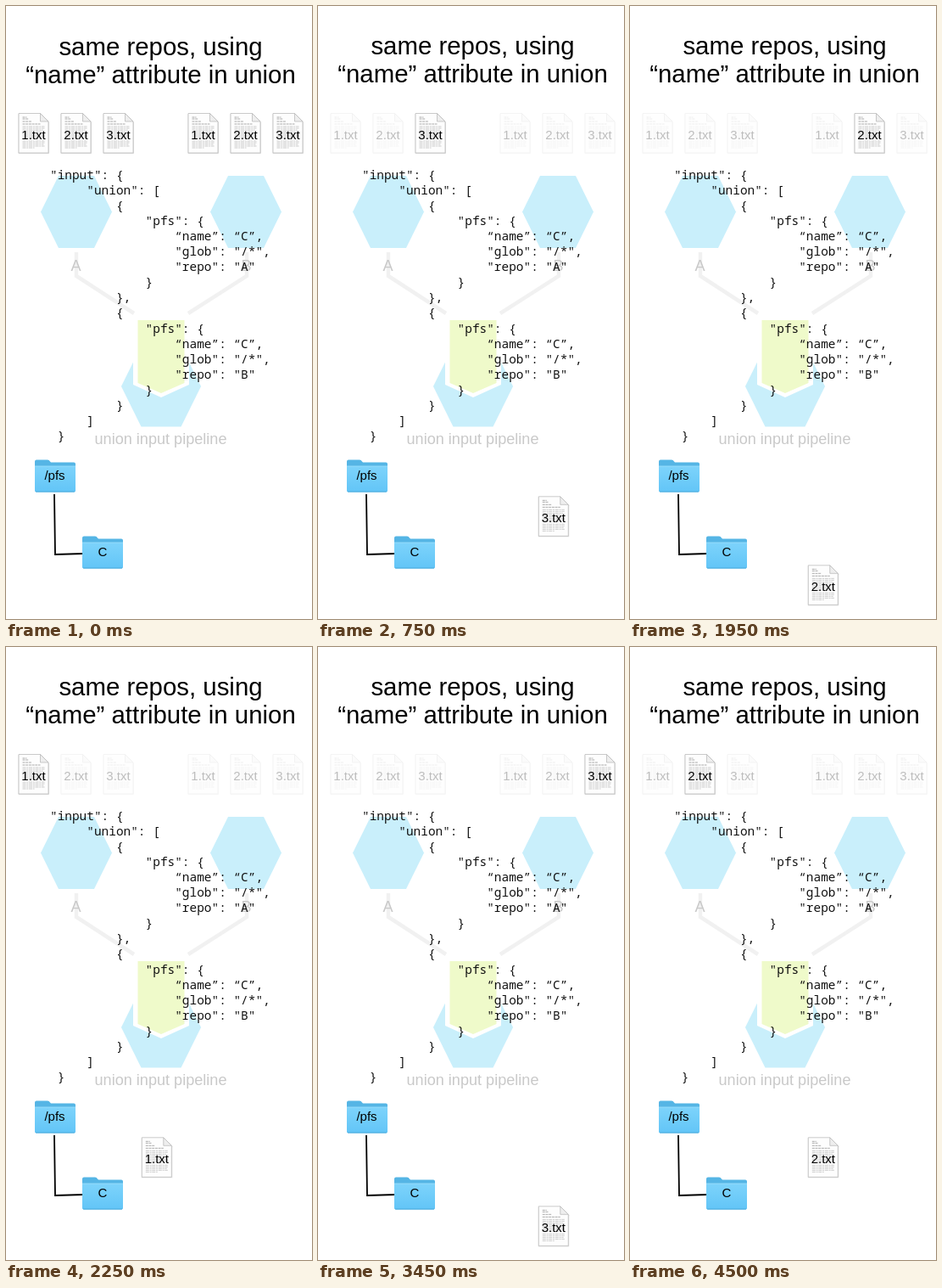
Animation, 361 px wide and 722 px high, one loop 5250 ms. Source, as an HTML page:

```html
<!DOCTYPE html>
<html lang="en">
<head>
<meta charset="utf-8">
<title>Union input</title>
<style>
  html, body { margin: 0; height: 100%; overflow: hidden; background: #fff; }
  svg { display: block; width: 361px; height: 722px; font-family: "Liberation Sans", Arial, sans-serif; }
  .mid { text-anchor: middle; }
  .title { font-size: 29.4px; }
  .code { font: 14.43px "Noto Sans Mono", monospace; white-space: pre; fill: #111; }
  .caption { font-size: 18.1px; fill: #c9c9c9; }
  .label { font-size: 15px; }
  .faded .page { opacity: .2; }
  .faded .label { opacity: .24; }
</style>
</head>
<body>
<svg id="stage" viewBox="0 0 361 722">
  <defs>
    <linearGradient id="blue" x2="0" y2="1">
      <stop stop-color="#7dd3fb"/><stop offset="1" stop-color="#62c5f7"/>
    </linearGradient>
    <g id="page">
      <path d="M-18 1H8.500L18.500 11V48H-18Z" fill="#000" opacity=".13"/>
      <path d="M-17.500.5H8L17.500 10V47H-17.500Z" fill="#fdfdfd" stroke="#bdbdbd" stroke-width=".8"/>
      <path d="M-13 5h5M-13 7h7M-13 10h11M-13 13h21" stroke="#aaa" stroke-dasharray="3 .7"/>
      <path d="M-13 16h26M-13 18h26M-13 20h24M-13 22h26M-13 24h25M-13 26h26M-13 28h26M-13 30h22M-13 33h26M-13 35h26M-13 37h25M-13 39h26M-13 41h14"
            stroke="#c6c6c6" stroke-width=".9" stroke-dasharray="4 .8 2 .7"/>
      <path d="M8 .5V10H17.500Z" fill="#eee" stroke="#b5b5b5" stroke-width=".7"/>
    </g>
    <g id="folder">
      <path d="M0 2q0-2 2-2h13q2 0 3 2l1 1h27q2 0 2 2v32H0Z" fill="#55b5e5"/>
      <path d="M0 7.500h48V36q0 2-2 2H2q-2 0-2-2Z" fill="url(#blue)"/>
      <path d="M0 7.500h48" stroke="#a0e0fc" stroke-width=".8"/>
      <path d="M1 37.500h46" stroke="#4ba9da"/>
    </g>
    <path id="hexagon" d="M-42 0L-21-42.500H21L42 0 21 42.500H-21Z" fill="#c9effb"/>
  </defs>

  <g id="title" class="title mid">
    <text x="182.500" y="57">same repos, using</text>
    <text x="182.500" y="90">“name” attribute in union</text>
  </g>

  <use href="#hexagon" x="83" y="242.500"/>
  <use href="#hexagon" x="283" y="242.500"/>
  <use href="#hexagon" transform="translate(183 448) scale(1.12)"/>
  <path d="M83 290V318L151 362M284 290V318L215 362" fill="none" stroke="#f1f1f1" stroke-width="4.500"/>
  <path d="M150 366H216V446L183 461 150 446Z" fill="#fff"/>
  <path d="M155.500 370H210.500V444L183 456 155.500 444Z" fill="#effaca"/>
  <g class="caption mid">
    <text x="82.500" y="312">A</text>
    <text x="283.500" y="312">B</text>
    <text x="182.500" y="516">union input pipeline</text>
  </g>

  <g id="code" class="code"></g>

  <path d="M57 575L58 646 91 645" fill="none" stroke="#000" stroke-width="1.800"/>
  <use href="#folder" x="34" y="534.500"/>
  <use href="#folder" x="90" y="624.500"/>
  <g class="label mid">
    <text x="57.500" y="558">/pfs</text>
    <text x="114" y="648">C</text>
  </g>
</svg>

<script>
const stage = document.getElementById("stage");
const title = document.getElementById("title");

function add(parent, tag, attrs, text = "") {
  const node = document.createElementNS("http://www.w3.org/2000/svg", tag);
  for (const key in attrs) node.setAttribute(key, attrs[key]);
  node.textContent = text;
  return parent.appendChild(node);
}

function addFile(name, x, y) {
  const file = add(stage, "g", { transform: `translate(${x} ${y})` });
  add(file, "use", { href: "#page", class: "page" });
  add(file, "text", { class: "label mid", y: 30.5 }, name);
  return file;
}

const pfs = repo => [
  [9, "{"], [13, '"pfs": {'], [17, "“name”: “C”,"], [17, '"glob": "/*",'],
  [17, `"repo": "${repo}"`], [13, "}"]
];
const lines = [
  [0, '"input": {'], [5, '"union": ['], ...pfs("A"), [9, "},"],
  ...pfs("B"), [9, "}"], [5, "]"], [1, "}"]
];
lines.forEach(([column, text], row) =>
  add(document.getElementById("code"), "text",
    { x: 52 + column * 8.66, y: 204 + row * 18.05 }, text));

// Files 0-2 belong to repo A, 3-5 to repo B.
const files = [0, 1, 2, 3, 4, 5].map(i => {
  const repo = Math.floor(i / 3), slot = i % 3, name = `${slot + 1}.txt`;
  return {
    input: addFile(name, 32.5 + repo * 200 + slot * 50, 126),
    output: addFile(name, 177.8 + slot * 50, 577.3 + repo * 81)
  };
});

const order = [null, 2, 4, 0, 5, 3, 1];
const stepTime = 750;

function draw() {
  const active = order[Math.floor(performance.now() / stepTime) % order.length];
  const idle = active === null;
  title.setAttribute("transform", `translate(0 ${idle ? 1 : 0})`);
  files.forEach(({ input, output }, i) => {
    input.setAttribute("class", idle || i === active ? "" : "faded");
    output.setAttribute("visibility", i === active ? "visible" : "hidden");
  });
  requestAnimationFrame(draw);
}
draw();
</script>
</body>
</html>
```
